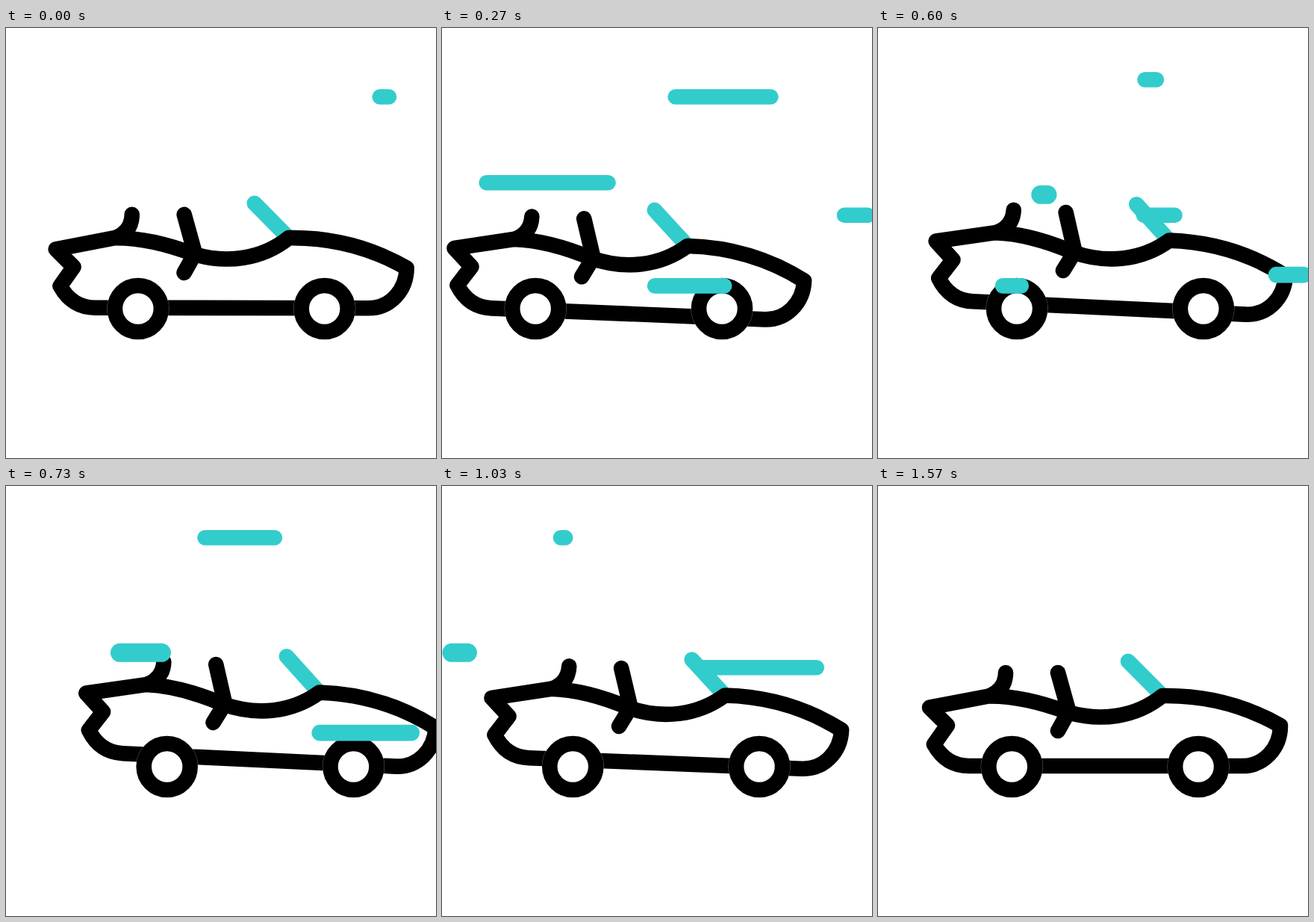
An HTML page that plays this animation: 576x576 px, repeating every 1670 ms.

```html
<!DOCTYPE html>
<html lang="en">
<head>
<meta charset="utf-8">
<title>Speeding convertible</title>
<style>
  html, body { margin: 0; width: 100%; height: 100%; overflow: hidden; background: #fff; }
  svg { display: block; width: 100%; height: 100%; }
  .ink, .streak { fill: none; stroke: #000; stroke-width: 20.6; stroke-linecap: round; stroke-linejoin: round; }
  .streak { stroke: #33cccc; }
</style>
</head>
<body>
<svg viewBox="0 0 576 576">
  <g id="car">
    <g id="body">
      <path class="streak" d="M335 234.700L381 281"/>
      <path class="ink" d="M171 250C171 265 164 275 150 281M241 250L255.500 302L241 328"/>
      <path class="ink" d="M69 296.700L148 281.500C186 281 222 291 254 303C298 316 345 310 381 281C437 280 490 293 539 321C539 351 517 375 488 375H122C100 375 85 364 75 346L93 320.500Z"/>
    </g>
    <g id="wheels">
      <g id="wheel">
        <circle cx="179.3" cy="376" r="41.7" fill="#fff" opacity=".5"/>
        <circle class="ink" cx="179.3" cy="376" r="31" style="fill:#fff"/>
      </g>
      <use href="#wheel" x="249.8"/>
    </g>
  </g>
  <g id="streaks"></g>
</svg>
<script>
const LOOP = 1670;
const $ = id => document.getElementById(id);

// Keys are [time, value] pairs joined by sine easing.
const shiftKeys = [[-50, 0], [333, -58.3], [767, 37.8], [1173, -19.1], [1567, 0]];
const liftKeys = [[0, 0], [320, 8.4], [433, 8.4], [767, -8.5], [1250, 0]];
const tiltKeys = [[-50, 0], [367, 2.72], [933, 2.72], [1310, 0]];

// Each streak's leading end leaves first, then the trailing end catches up.
const streaks = [
  { y: 92.2, from: 513, to: 299, head: [-60, 330], tail: [140, 460] },
  { y: 207.2, from: 250, to: 36, head: [0, 340], tail: [196, 499] },
  { y: 250.8, from: 570, to: 356, head: [177, 538], tail: [380, 690] },
  { y: 345.4, from: 388, to: 167, head: [19, 537], tail: [197, 712] },
  { y: 69.2, from: 373, to: 159, head: [529, 939], tail: [668, 1078] },
  { y: 223.3, from: 227, to: 13, head: [534, 1030], tail: [639, 1135], width: 25 },
  { y: 330.6, from: 570, to: 356, head: [500, 870], tail: [648, 1018], width: 21.8 },
  { y: 243.2, from: 525, to: 338, head: [760, 1080], tail: [960, 1280] }
];

for (const s of streaks) {
  s.el = document.createElementNS("http://www.w3.org/2000/svg", "path");
  s.el.setAttribute("class", "streak");
  if (s.width) s.el.style.strokeWidth = s.width;
  $("streaks").append(s.el);
}

function ease(t, start, end) {
  const p = Math.min(1, Math.max(0, (t - start) / (end - start)));
  return (1 - Math.cos(Math.PI * p)) / 2;
}

function valueAt(keys, t) {
  let value = keys[0][1];
  for (let i = 1; i < keys.length; i++) {
    const [t0, v0] = keys[i - 1], [t1, v1] = keys[i];
    value += (v1 - v0) * ease(t, t0, t1);
  }
  return value;
}

// Thirty pictures a second, switching on whole hundredths.
function stepped(ms) {
  const rest = ms % 100;
  const n = Math.floor(ms / 100) * 3 + (rest >= 30) + (rest >= 70);
  return n * 100 / 3;
}

function draw(t) {
  $("car").setAttribute("transform", `translate(${valueAt(shiftKeys, t)} 0)`);
  $("body").setAttribute("transform",
    `translate(0 ${valueAt(liftKeys, t)}) rotate(${valueAt(tiltKeys, t)} 304 330)`);
  for (const s of streaks) {
    const along = span => s.from + (s.to - s.from) * ease(t, ...span);
    const visible = t > s.head[0] && t < s.tail[1];
    s.el.setAttribute("d", visible ? `M${along(s.head)} ${s.y}H${along(s.tail)}` : "");
  }
}

const began = performance.now();
function tick() {
  draw(stepped((performance.now() - began) % LOOP));
  requestAnimationFrame(tick);
}
tick();
</script>
</body>
</html>
```
